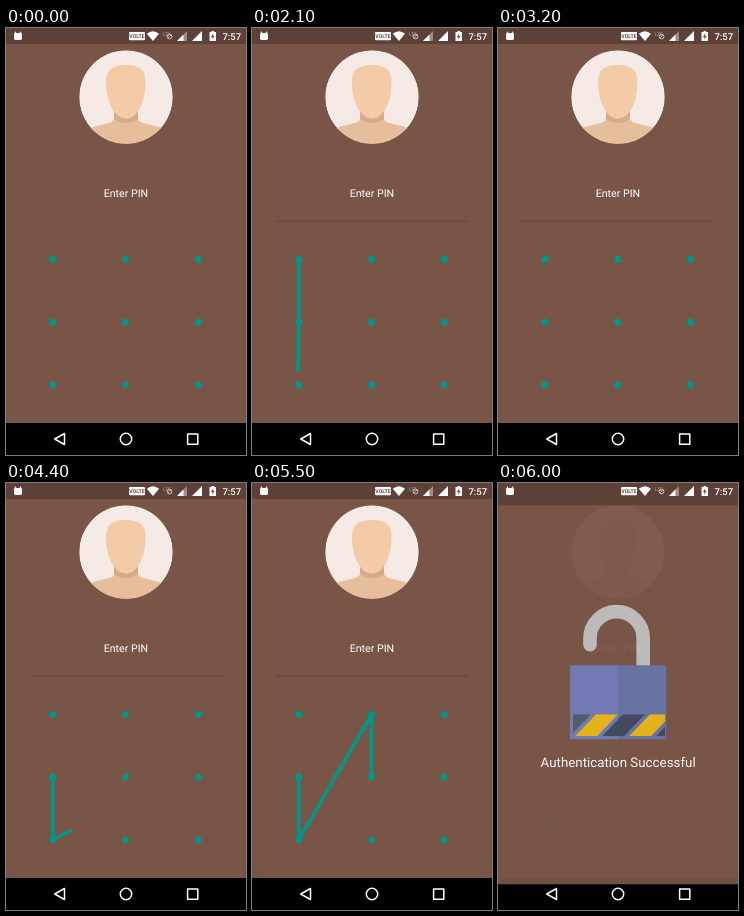
Animation, 240 px wide and 427 px high, one loop 6100 ms. Source, as an HTML page:

```html
<!DOCTYPE html>
<html lang="en">
<head>
<meta charset="utf-8">
<title>Pattern unlock</title>
<style>
html, body { margin: 0; width: 100%; height: 100%; overflow: hidden; background: #000; }
svg { display: block; width: 100vw; height: 100vh; }
text { font-family: Roboto, "Open Sans", sans-serif; fill: #fff; text-rendering: geometricPrecision; }
.mid { text-anchor: middle; }
</style>
</head>
<body>
<svg viewBox="0 0 240 427">
  <defs>
    <clipPath id="round"><circle cx="120" cy="69" r="46.8"/></clipPath>
    <clipPath id="band"><rect x="75" y="225" width="92" height="22"/></clipPath>
  </defs>

  <rect width="240" height="395" fill="#795548"/>
  <rect width="240" height="16" fill="#5d4037"/>

  <g clip-path="url(#round)">
    <circle cx="120" cy="69" r="46.8" fill="#f5eae6"/>
    <path d="M108 80V91Q107 94 101 95.500L87 99Q80 101 78 118H162Q160 101 153 99L139 95.500Q133 94 132 91V80Z" fill="#e6be9b"/>
    <path d="M108 82H132V91Q127 95 120 95T108 91Z" fill="#d5ab89"/>
    <path d="M100 54C100 42 106 37 120 37S139.500 42 139.500 54C139.500 73 132 90.500 120 90.500S100 73 100 54Z" fill="#f3cba6"/>
  </g>
  <text class="mid" x="119.900" y="169.300" font-size="10.650">Enter PIN</text>
  <rect id="rule" x="24" y="192.500" width="192" height="1.200" fill="#6c483d"/>
  <g id="dots"></g>
  <path id="trail" fill="none" stroke-width="3.700" stroke-linecap="round" stroke-linejoin="round"/>
  <rect y="395" width="240" height="32"/>

  <g id="done">
    <rect width="240" height="395" fill="#795548"/>
    <rect width="240" height="16" fill="#5d4037"/>
    <path d="M92 155.500V149A26.600 26.600 0 0 1 145.200 149V178" fill="none" stroke="#c1c1c1" stroke-width="13.600" stroke-linecap="round"/>
    <rect x="72" y="176" width="48" height="74" fill="#737bb9"/>
    <rect x="120" y="176" width="48.300" height="74" fill="#6874a8"/>
    <g id="stripes" clip-path="url(#band)"></g>
    <text class="mid" x="120.100" y="277.400" font-size="13.330">Authentication Successful</text>
  </g>

  <g fill="#fff">
    <path d="M8 6.200Q8 5 9.200 5H14.800Q16 5 16 6.200V10.600Q16 12 14.600 12H9.400Q8 12 8 10.600ZM9 3L10.500 5H8.800ZM15 3L15.200 5H13.500Z"/>
    <rect x="123" y="4" width="16" height="8.300" rx="1"/>
    <text class="mid" x="131" y="10.100" font-size="5.200" font-weight="700" style="fill:#5d4037">VOLTE</text>
    <path d="M140.800 5.800Q147 .8 153 5.800L147 13Z"/>
    <g opacity=".7">
      <text x="157" y="7.500" font-size="5" style="opacity:.75">LTE</text>
      <circle cx="163.500" cy="8.500" r="2.400" fill="none" stroke="#fff" stroke-width="1"/>
      <path d="M162 10L165 7" stroke="#fff" stroke-width=".8"/>
    </g>
    <path d="M181 3V13H171Z" opacity=".4"/>
    <path d="M177.500 6.500V13H171Z"/>
    <path d="M196 3V13H186Z"/>
    <path d="M203.500 4H205.500V3H208V4H210V13H203.500Z"/>
    <path d="M207.300 5.200L205 9H206.600L206.200 11.800L208.600 8H207Z" fill="#5d4037"/>
    <text x="216.400" y="11.700" font-size="9.500" font-weight="500">7:57</text>
  </g>
  <g fill="none" stroke="#fff" stroke-width="1.500" stroke-linejoin="round">
    <path d="M58.500 405.500V416.500L48.700 411Z"/>
    <circle cx="120" cy="411" r="5.700"/>
    <rect x="181.600" y="406" width="10.200" height="10.200"/>
  </g>
</svg>
<script>
const LOOP = 6100, STEP = 100, SWITCH = 5800;
const TEAL = "#009688", RED = "#f44336";
const $ = id => document.getElementById(id);
const make = (tag, parent, attrs) => {
  const el = document.createElementNS("http://www.w3.org/2000/svg", tag);
  for (const k in attrs) el.setAttribute(k, attrs[k]);
  return parent.appendChild(el);
};

// 3 x 3 grid, numbered row by row
const node = i => [46.8 + 72.8 * (i % 3), 231.5 + 62.7 * Math.floor(i / 3)];
const dots = Array.from({ length: 9 }, (_, i) => {
  const [cx, cy] = node(i);
  return make("circle", $("dots"), { cx, cy, r: 3.4 });
});

for (let i = 0; i < 5; i++)
  make("path", $("stripes"), {
    d: `M${71 + 27 * i} 225h22l-21 22h-22Z`,
    fill: i % 2 ? "#e9b71b" : i ? "#42495f" : "#4b606e"
  });

// Nodes in order and the moment the finger reaches each
const swipes = [
  { path: [0, 3, 6, 7, 8], times: [1450, 1900, 2160, 2380, 2600], wrong: 2800, clear: 3100 },
  { path: [3, 6, 1, 4], times: [3850, 4300, 5200, 5500], wrong: LOOP, clear: LOOP }
];

// The finger bows sideways early in a leg, more so on long ones
function finger(a, b, k) {
  const dx = b[0] - a[0], dy = b[1] - a[1];
  const bow = 0.00057 * Math.hypot(dx, dy) * Math.sin(Math.PI * Math.sqrt(k));
  return [a[0] + dx * k - dy * bow, a[1] + dy * k + dx * bow];
}

function trace({ path, times }, t) {
  const n = times.filter(x => x <= t).length;
  const points = path.slice(0, n).map(node);
  if (n < path.length) {
    const k = (t - times[n - 1]) / (times[n] - times[n - 1]);
    points.push(finger(points[n - 1], node(path[n]), k));
  }
  return { hit: path.slice(0, n), points };
}

function draw(time) {
  const t = Math.floor(time / STEP) * STEP;
  const swipe = swipes.find(s => t >= s.times[0] && t < s.clear);
  const { hit, points } = swipe ? trace(swipe, t) : { hit: [], points: [] };
  const color = swipe && t >= swipe.wrong ? RED : TEAL;
  $("trail").setAttribute("d", points.length ? "M" + points.join("L") : "");
  $("trail").setAttribute("stroke", color);
  dots.forEach((d, i) => d.setAttribute("fill", hit.includes(i) ? color : TEAL));
  $("rule").setAttribute("opacity", t < 1500 ? 0 : 1);

  // The next screen fades in while its offset halves with each step
  const n = (t - SWITCH) / STEP;
  $("done").setAttribute("opacity", n < 0 ? 0 : 0.28 + 0.335 * n);
  $("done").setAttribute("transform", `translate(0 ${n < 0 ? 0 : 25 * 0.5 ** n})`);
}

const start = performance.now();
function tick() {
  draw((performance.now() - start) % LOOP);
  requestAnimationFrame(tick);
}
tick();
</script>
</body>
</html>
```
